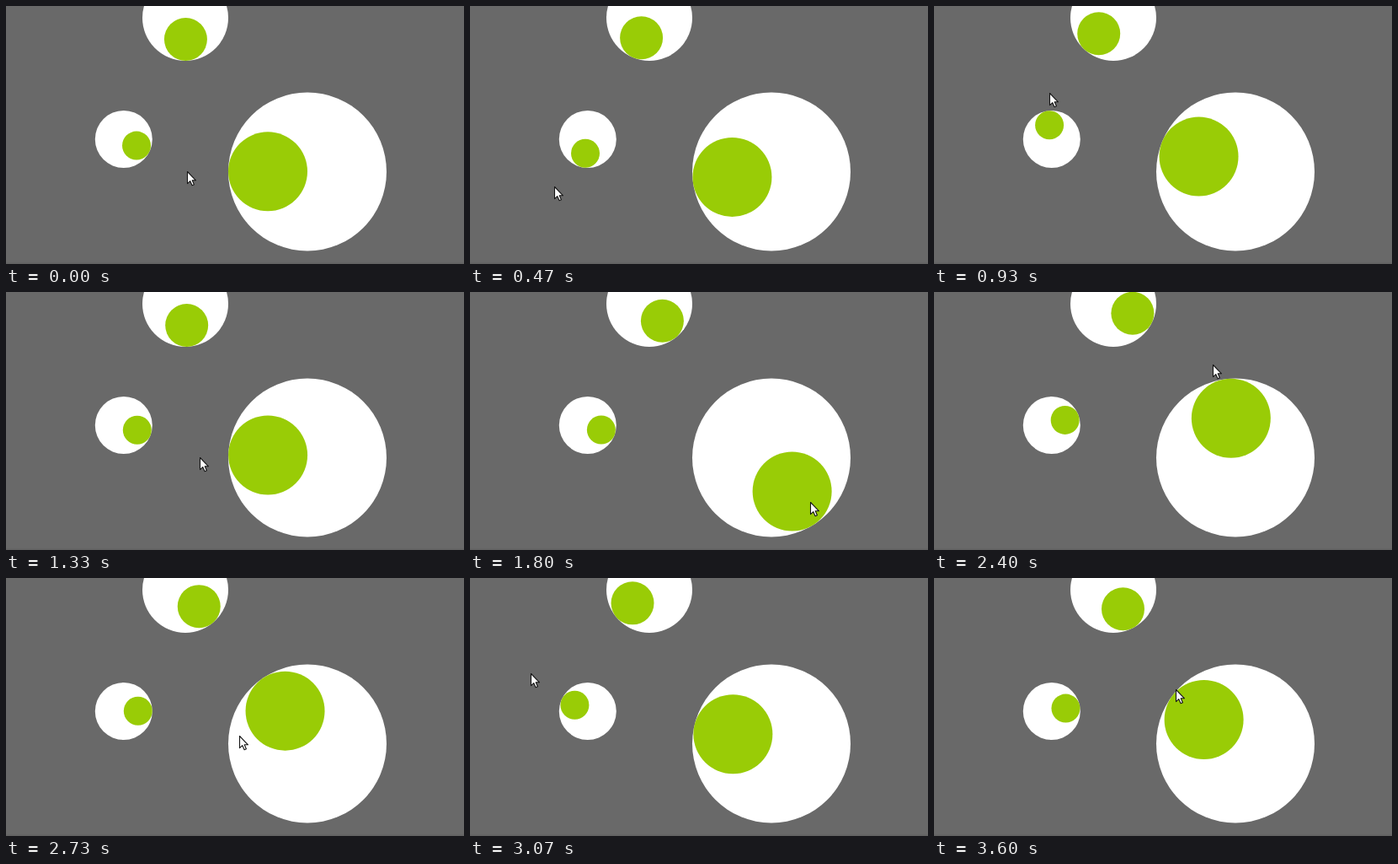
These frames come from a looping animation (544 by 306 pixels, 3.67 s). An HTML page:

```html
<!DOCTYPE html>
<html lang="en">
<head>
<meta charset="utf-8">
<title>Eyes following the pointer</title>
<style>
  html, body { margin: 0; width: 100%; height: 100%; overflow: hidden; background: #696969; }
  svg { display: block; width: 100%; height: 100%; }
</style>
</head>
<body>
<svg viewBox="0 0 544 306">
  <rect width="544" height="306" fill="#696969"/>
  <rect y="304.5" width="544" height="1.5" fill="#626262"/>
  <g id="eyes"></g>
  <path id="pointer" d="M0 .5V14.6L3.3 11.7 5.6 16.8 7.9 15.8 5.7 10.8H10Z"
        fill="#fff" stroke="#151515" stroke-width="1.1" stroke-linejoin="round"/>
</svg>
<script>
const LOOP = 3670, STEP = 200 / 3, LAST = 54;

const EYES = [
  { x: 213, y: 14, r: 51 },
  { x: 139.8, y: 158, r: 34 },
  { x: 358, y: 196.5, r: 94 }
];

// Turning points of the pointer: step, x, y
const PATH = [
  [0, 216, 196], [5, 150, 235], [9, 67, 178], [13, 131, 103], [14, 138, 103],
  [18, 216, 179], [20, 231, 196], [24, 286, 258], [26, 386, 242], [27, 405, 249],
  [30, 472, 185], [35, 345, 79], [36, 332, 86], [39, 366, 130], [43, 165, 224],
  [45, 72, 126], [46, 73, 113], [49, 145, 46], [53, 272, 131], [54, 288, 132]
];

const clamp = (v, max) => Math.max(0, Math.min(max, v));
const key = i => PATH[clamp(i, PATH.length - 1)];

// Smooth curve through the turning points
function pointerAt(step) {
  const s = clamp(step, LAST);
  const i = clamp(PATH.findIndex(k => k[0] > s) - 1, PATH.length - 2);
  const seg = s === LAST ? PATH.length - 2 : i;
  const [p, a, b, n] = [-1, 0, 1, 2].map(d => key(seg + d));
  const span = b[0] - a[0], u = (s - a[0]) / span;
  const blend = k => {
    const m = span * (b[k] - p[k]) / (b[0] - p[0]);
    const q = span * (n[k] - a[k]) / (n[0] - a[0]);
    const d = b[k] - a[k];
    return a[k] + u * (m + u * (3 * d - 2 * m - q + u * (m + q - 2 * d)));
  };
  return { x: blend(1), y: blend(2) };
}

const eyeLayer = document.getElementById('eyes');
const pointer = document.getElementById('pointer');

function circle(x, y, r, fill) {
  const el = document.createElementNS('http://www.w3.org/2000/svg', 'circle');
  const attrs = { cx: x, cy: y, r, fill };
  for (const name in attrs) el.setAttribute(name, attrs[name]);
  return eyeLayer.appendChild(el);
}

for (const eye of EYES) {
  circle(eye.x, eye.y, eye.r, '#fff');
  eye.pupil = circle(eye.x, eye.y, eye.r / 2, '#99cc06');
}

function draw(time) {
  // Steps begin on whole hundredths of a second
  const step = Math.min(LAST, Math.floor((time % LOOP + 4) / STEP));
  const tip = pointerAt(step);
  const look = pointerAt(step - 1); // the eyes trail by one step
  pointer.setAttribute('transform', `translate(${Math.round(tip.x) - 0.5} ${Math.round(tip.y)})`);
  for (const { x, y, r, pupil } of EYES) {
    const angle = Math.atan2(look.y - y, look.x - x);
    pupil.setAttribute('cx', x + Math.cos(angle) * r / 2);
    pupil.setAttribute('cy', y + Math.sin(angle) * r / 2);
  }
}

const start = performance.now();
function tick() {
  draw(performance.now() - start);
  requestAnimationFrame(tick);
}
tick();
</script>
</body>
</html>
```
